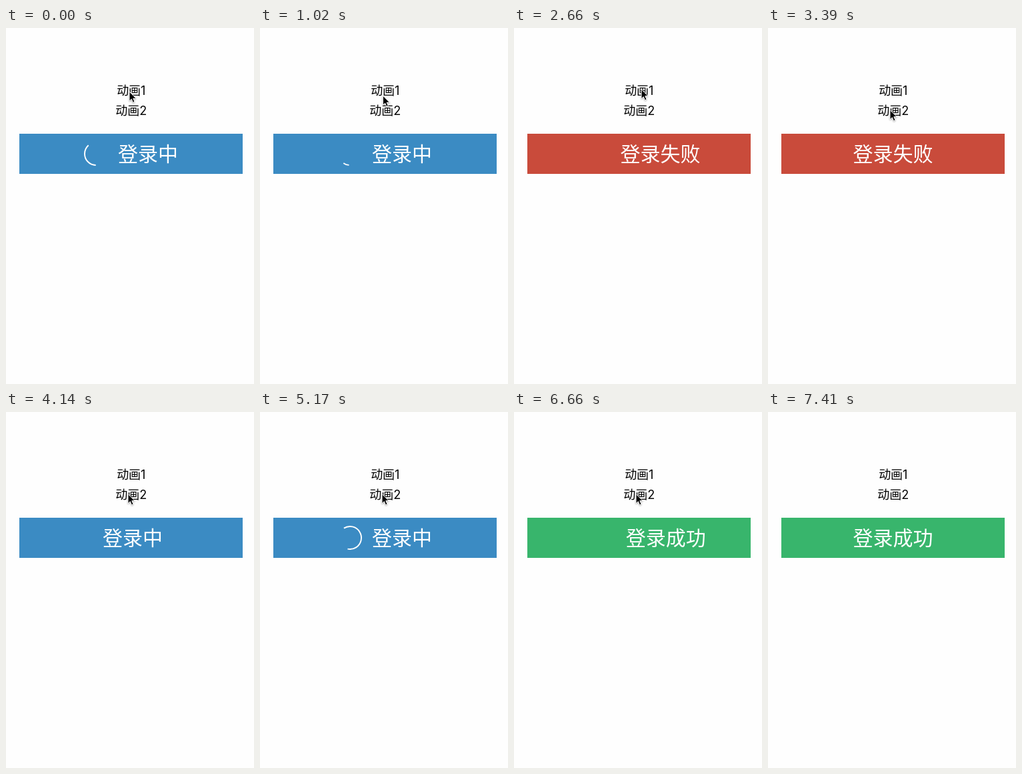
Recreate the animation shown at these times as an HTML page. Size 372 by 532 pixels, loop 7.9 s.

```html
<!DOCTYPE html>
<html lang="zh-CN">
<head>
<meta charset="utf-8">
<title>登录按钮</title>
<style>
  html, body { margin: 0; width: 100%; height: 100%; overflow: hidden; background: #fefefe; }
  svg { display: block; }
  text { font-family: Inter, "Noto Sans CJK SC", sans-serif; }
  .option { font-size: 18px; text-anchor: middle; }
  #label { font-size: 30px; font-weight: 300; fill: #fff; }
</style>
</head>
<body>
<svg width="372" height="532" viewBox="0 0 372 532">
  <text class="option" x="187.8" y="100">动画1</text>
  <text class="option" x="187.8" y="130">动画2</text>
  <rect id="button" x="20" y="158" width="335" height="60"/>
  <circle id="spinner" cx="135" cy="188" r="17" pathLength="360" fill="none" stroke="#fff" stroke-width="1.9"/>
  <text id="label" y="199"></text>
  <path id="cursor" d="M0 0V14.2L3.3 11.2L5.5 16.4L8 15.3L5.8 10.2H10.2Z"
        stroke="#fff" stroke-width="1" style="filter: drop-shadow(0 1px 1px #0005)"/>
</svg>
<script>
const LOOP = 7900, HOLD = 146.2, STEP = 147.8, SLIDE = 500;
const CURSOR_GONE = 7380;
const LEFT = { loading: 142.5, beside: 168, result: 127.5 };

// Each login attempt: on-screen start, number of steps, spin start, result time
const attempts = [
  { from: 0, steps: 23, begin: -505, end: 2510, text: '登录失败', color: '#c94b3b' },
  { from: 4140, steps: 22, begin: 4040, end: 6625, text: '登录成功', color: '#38b56c' }
];
const cursorPath = [
  [0, 185, 95], [300, 185, 95], [1170, 184, 104], [1910, 189, 105],
  [2360, 191, 91.5], [2660, 191, 91.5], [3390, 183, 122.5]
];

const [button, spinner, label, cursor] =
  ['button', 'spinner', 'label', 'cursor'].map(id => document.getElementById(id));
const clamp = x => Math.min(1, Math.max(0, x));
const ease = x => (1 - Math.cos(Math.PI * clamp(x))) / 2;
const mix = (a, b, k) => a + (b - a) * k;

function drawSpinner(ms) {
  const phase = ms % 1500;
  const head = 90 * ease(phase / 1000) + 270 * ease((phase - 1000) / 500);
  const tail = 360 * ease(phase / 1000);
  spinner.setAttribute('stroke-dasharray', `${tail - head} 720`);
  spinner.setAttribute('transform', `rotate(${ms / 4000 * 360 + head} 135 188)`);
}

function drawCursor(t) {
  const next = cursorPath.findIndex(point => point[0] > t);
  const b = cursorPath.at(next), a = next > 0 ? cursorPath[next - 1] : b;
  const k = a === b ? 0 : (t - a[0]) / (b[0] - a[0]);
  cursor.setAttribute('transform', `translate(${mix(a[1], b[1], k)} ${mix(a[2], b[2], k)})`);
  cursor.setAttribute('visibility', t < CURSOR_GONE ? 'visible' : 'hidden');
}

function draw(time) {
  const now = time % LOOP;
  const attempt = attempts[now < attempts[1].from ? 0 : 1];
  const { from, steps, begin, end, text, color } = attempt;
  // The picture advances in even, visible steps
  const t = from + STEP * Math.min(steps, Math.floor((now - from) / HOLD));
  const loading = t < end;

  button.setAttribute('fill', loading ? '#3b8bc3' : color);
  label.textContent = loading ? '登录中' : text;
  label.setAttribute('x', loading
    ? mix(LEFT.loading, LEFT.beside, ease((t - begin) / SLIDE))
    : mix(LEFT.beside, LEFT.result, ease((t - end) / SLIDE)));
  spinner.setAttribute('visibility', loading ? 'visible' : 'hidden');
  drawSpinner(t - begin);
  drawCursor(t);
}

const start = performance.now();
function tick() {
  draw(performance.now() - start);
  requestAnimationFrame(tick);
}
tick();
</script>
</body>
</html>
```
